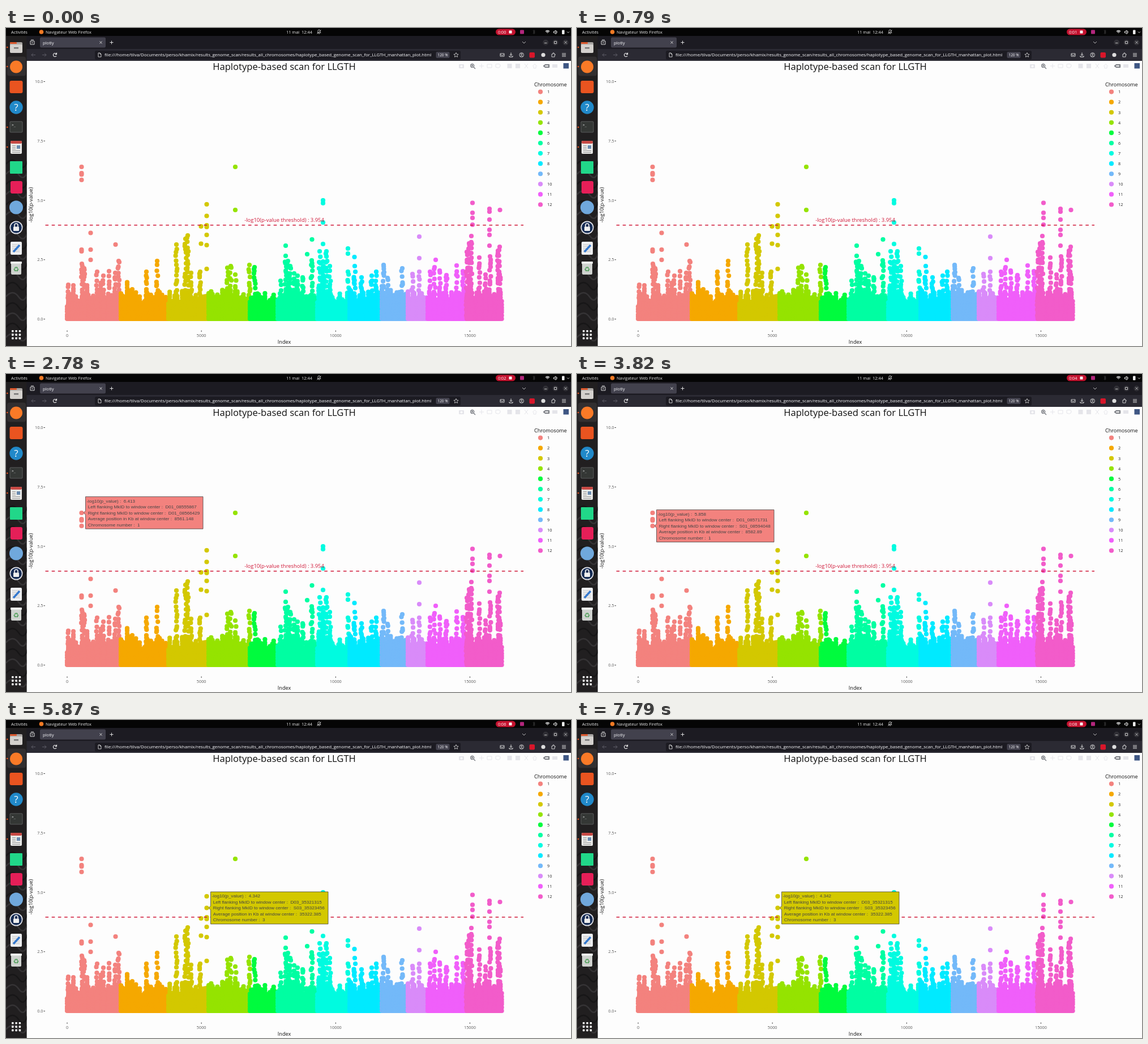
Write an HTML page with a canvas that moves like this. It is 998x561 px and loops after 8000 ms.

```html
<!DOCTYPE html>
<html lang="fr">
<head>
<meta charset="utf-8">
<title>Haplotype-based scan</title>
<style>
html, body { margin: 0; width: 100%; height: 100%; overflow: hidden; background: #000; }
canvas { display: block; }
</style>
</head>
<body>
<canvas id="stage" width="998" height="561"></canvas>
<script>
const LOOP = 8000;
const SANS = '"Open Sans", sans-serif';
const ARIAL = '"Liberation Sans", Arial, sans-serif';
const COLORS = ['#f3827e', '#f5a800', '#d3c800', '#95e300', '#00fb3e', '#00fea2',
  '#00fbe0', '#00eaff', '#73b9f9', '#d98bf9', '#f05ffa', '#f25cca'];
const STARTS = [108, 203, 287, 358, 431, 480, 550, 607, 664, 710, 745, 814, 876];

// Dense columns per chromosome: x, top, x, top ...
const STACKS = [
  [110, 453, 134, 416, 138, 424, 161, 430, 172, 437, 182, 429, 193, 432, 199, 411],
  [217, 463, 223, 461, 248, 430, 267, 411],
  [301, 382, 317, 372, 321, 366, 327, 432, 343, 430],
  [391, 423, 397, 420, 405, 435, 430, 418],
  [439, 422],
  [485, 446, 494, 402, 498, 411, 502, 420, 509, 433, 515, 437, 524, 440, 540, 410],
  [554, 394, 560, 412, 566, 394, 572, 420, 604, 430],
  [616, 420, 628, 440, 646, 437, 654, 430],
  [667, 418, 674, 441, 700, 424],
  [718, 434, 730, 430],
  [749, 430, 757, 422, 766, 428, 778, 436, 796, 419, 807, 429],
  [814, 395, 818, 380, 822, 367, 836, 405, 847, 435, 855, 403, 869, 393, 872, 386]
];
// Isolated points above the columns, by x
const PEAKS = {
  133.5: [245, 256, 258.5, 268, 391, 394], 149.5: [361.5, 391, 409], 193.5: [382],
  344.5: [350, 380.5], 354.5: [311, 331.5, 348, 351, 365, 383, 425],
  405: [245, 321], 494: [384], 532: [399], 540.5: [373], 560: [304, 309, 343, 381],
  604: [389, 398], 615.5: [404], 730: [368, 406], 759: [409],
  824: [308.5, 326, 335, 347], 854: [319, 324, 338, 356, 365, 384], 872.5: [321]
};

const TIPS = [
  { from: 1230, to: 3110, x: 133.5, y: 244.8, chr: 1, p: '6.413', left: 'D01_08555867', right: 'D01_08566429', pos: '8561.148' },
  { from: 3110, to: 3470, x: 133.5, y: 256, chr: 1, p: '6.148', left: 'D01_08566429', right: 'D01_08571731', pos: '8569.08' },
  { from: 3470, to: 5390, x: 133.5, y: 268, chr: 1, p: '5.858', left: 'D01_08571731', right: 'S01_08594048', pos: '8582.89' },
  { from: 5870, to: 6040, x: 354.5, y: 331.5, chr: 3, p: '4.342', left: 'D03_35321315', right: 'S03_35323456', pos: '35322.385' },
  { from: 6040, to: 7070, x: 354.5, y: 311, chr: 3, p: '4.836', left: 'S03_35323456', right: 'D03_35328702', pos: '35326.079' },
  { from: 7070, to: 8000, x: 354.5, y: 331.5, chr: 3, p: '4.342', left: 'D03_35321315', right: 'S03_35323456', pos: '35322.385' }
];

const stage = document.getElementById('stage');
const backdrop = document.createElement('canvas');
backdrop.width = 998;
backdrop.height = 561;
let ctx = backdrop.getContext('2d');

let seed = 11;
function rand() {
  seed = (seed * 16807) % 2147483647;
  return seed / 2147483647;
}
function rect(x, y, w, h, fill, radius = 0) {
  ctx.fillStyle = fill;
  ctx.beginPath();
  ctx.roundRect(x, y, w, h, radius);
  ctx.fill();
}
function dot(x, y, r, fill) {
  ctx.fillStyle = fill;
  ctx.beginPath();
  ctx.arc(x, y, r, 0, 7);
  ctx.fill();
}
function path(d, color, width = 1) {
  ctx.strokeStyle = color;
  ctx.lineWidth = width;
  ctx.stroke(new Path2D(d));
}
function text(str, x, y, size, fill, align = 'left', family = SANS, weight = 400) {
  ctx.font = `${weight} ${size}px ${family}`;
  ctx.textAlign = align;
  ctx.fillStyle = fill;
  ctx.fillText(str, x, y);
}

function drawTopBar() {
  rect(0, 0, 998, 14, '#050505');
  text('Activités', 9, 9.7, 7.5, '#e8e8e8');
  dot(62.5, 7, 3.8, '#f47a24');
  text('Navigateur Web Firefox', 70, 9.7, 7.45, '#e8e8e8');
  text('11 mai  12:44', 495, 9.7, 7.4, '#eee');
  path('M550 8.5h6l-1-1.5v-2a2 2 0 0 0-4 0v2zM549.5 10.5l7-7M552 10h2', '#ddd', .8);
  rect(865, 1.5, 35, 11, '#c4122f', 5.5);
  rect(888.5, 4.5, 5, 5, '#fff', .5);
  rect(908, 3.5, 7, 7, '#b3267d', 1);
  path('M930.5 4.5l4 4-2 2v-7l2 2-4 4', '#3b3b3b', .8);
  path('M953 6q3.500-3 7 0M954.500 7.500q2-1.500 4 0M956.500 9.500v.5', '#eee', 1.3);
  path('M967.5 6v2.500h1.500l2 2v-6.500l-2 2zM972.5 5q1.500 2 0 4.500', '#eee', 1);
  rect(982, 3.5, 4.5, 7.5, '#eee', 1);
  path('M991 6.5l2 2 2-2', '#ccc');
}

function drawBrowser() {
  rect(36, 14, 962, 23, '#1c1b22');
  rect(60, 16.5, 116, 18, '#42414d', 2.5);
  text('plotly', 65, 28.5, 7.6, '#fbfbfe');
  path('M165.500 23.500l4 4m0-4l-4 4M186.500 22.500v6m-3-3h6', '#ddd');
  path('M43 23h7v6h-7zM44 21h5M45 26h3', '#ddd');
  path('M912 24l3 3 3-3M951 26.500h4.500M968.500 23.500h4v4h-4zM986.500 23.500l4 4m0-4l-4 4', '#ccc', .9);
  dot(953.2, 25.5, 5, '#ffffff18');
  dot(970.5, 25.5, 5, '#ffffff18');
  dot(988.5, 25.5, 5, '#ffffff18');

  rect(36, 37, 962, 21, '#2b2a33');
  path('M52 47.500h-7m3-3l-3 3 3 3M64 47.500h7m-3-3l3 3-3 3', '#5d5c66');
  path('M89 46a3 3 0 1 0 0 3M89.500 43.500v3h-3', '#eee', 1.1);
  rect(157, 40, 646, 15.5, '#1c1b22', 2.5);
  path('M163 44h3l2 2v5h-5zM166 44v2h2', '#ddd', .9);
  text('file:///home/tilva/Documents/perso/khamix/results_genome_scan/results_all_chromosomes/haplotype_based_genome_scan_for_LLGTH_manhattan_plot.html',
    174, 50.4, 7.87, '#fbfbfe');
  rect(759.5, 42, 24, 11, '#42414d', 2);
  text('120 %', 771.5, 50, 6.4, '#fbfbfe', 'center');
  path('M795 43.500l1.200 2.600 2.800.3-2 2 .5 2.800-2.500-1.400-2.500 1.400.5-2.800-2-2 2.800-.3z', '#ddd', .8);
  path('M873 45h7v5h-7zM873 46.500l3.500 2 3.500-2', '#ddd', .9);
  path('M892 43.500v5m-2-2l2 2 2-2M889 49v2h6v-2', '#eee');
  path('M914.500 47.500a3.800 3.800 0 1 0-7.600 0a3.800 3.800 0 1 0 7.600 0M908.500 50q2.200-2.500 4.400 0M911.900 46.200a1.200 1.200 0 1 0-2.400 0a1.200 1.200 0 1 0 2.400 0', '#ddd', .9);
  rect(924.5, 43, 9.5, 9.5, '#d9162a', 2);
  dot(949, 47.5, 3.6, '#ddd');
  path('M964 46h2v-2h2v2h2v2h-1v3h-5z', '#ddd', .9);
  path('M982 45h7m-7 2.500h7m-7 2.500h7', '#ddd');
}

function drawDock() {
  rect(0, 14, 36.5, 547, '#211f20');
  ctx.save();
  ctx.beginPath();
  ctx.rect(0, 14, 36.5, 547);
  ctx.clip();
  for (let y = 240; y < 561; y += 18)
    path(`M0 ${y}q12-14 22 0t16-6`, y % 4 ? '#353335' : '#171617', 2.5);
  ctx.restore();
  rect(2, 50.5, 33, 34, '#55505255', 4);
  for (const y of [34, 68, 175, 210]) dot(2.3, y, 1.3, '#e95420');

  rect(7, 25, 22, 18, '#a9a6a3', 2);
  rect(7, 29, 22, 15, '#d4d1cd', 2);
  rect(7, 25, 12, 3, '#e0592d', 1);
  rect(14, 34, 8, 2.5, '#777');
  dot(18, 68.5, 11, '#fa7a27');
  rect(6.5, 93, 23, 22, '#e95420', 3);
  dot(18, 140, 11.7, '#2189c9');
  text('?', 18, 146, 17, '#fff', 'center');
  rect(6.5, 164.5, 23, 20, '#5b5d5c', 2);
  rect(7.5, 165.5, 21, 18, '#343735', 1);
  text('>_', 10, 173, 6, '#eee', 'left', '"DejaVu Sans Mono", monospace');
  rect(8, 199, 20, 23, '#e9e9e7', 2);
  rect(8, 199, 20, 5, '#c84a45', 2);
  for (let y = 207; y < 220; y += 3) rect(11, y, y < 214 ? 6 : 14, 1, '#999');
  rect(19, 207, 6, 6, '#6a8bb0');
  rect(7, 235, 22, 22, '#21d789', 1);
  rect(8, 270, 21, 22, '#e51f58', 3);
  dot(18, 316.5, 12, '#70a8dc');
  dot(18, 352, 11.5, '#e4e6ec');
  dot(18, 352, 9.8, '#172d55');
  rect(13, 350.5, 10, 7.5, '#eee', 1);
  path('M15 351v-3a3 3 0 0 1 6 0v3', '#eee', 1.7);
  rect(8, 377, 20, 23, '#edeef0', 2);
  for (let y = 382; y < 397; y += 3) rect(11, y, 13, .8, '#bbb');
  path('M13 395L24 383', '#3478ce', 3.4);
  rect(9, 413, 18, 22, '#cfd2cf', 2);
  rect(8, 412, 20, 4, '#eef0ee', 1);
  text('♻', 18, 430, 12, '#4b9c55', 'center', '"DejaVu Sans", sans-serif');
  for (let i = 0; i < 9; i++) rect(10 + i % 3 * 6.3, 533 + Math.floor(i / 3) * 6.3, 3.6, 3.6, '#f2f2f2', 1);
}

function drawModebar() {
  const faint = '#e5e5ea';
  rect(800, 64, 9, 7, faint, 1);
  dot(804.5, 67.5, 2, '#fdfdfd');
  path('M826.700 66.500a3 3 0 1 0-6 0a3 3 0 1 0 6 0M826 69l3 3M822.200 66.500h3M823.700 65v3', '#777a80', 1.3);
  path('M840 63v8m-4-4h8M850 64h8v6h-8zM865 64q9-2 8 3t-8 2z', faint);
  rect(885.5, 63, 8, 8, faint);
  rect(900, 63, 8, 8, faint);
  path('M916 71l6-8m0 8l-6-8M930 67.500l4-4 4 4M932 67v4h4v-4', faint);
  path('M950 67l2.500-2h6.500v4h-6.500z', '#777a80', 2);
  rect(965, 64, 9, 6, faint);
  rect(984.5, 62, 9.5, 9.5, '#3f5784');
}

function drawPoints() {
  const point = (x, y, chr) => dot(x, y, 4.1, COLORS[chr]);
  COLORS.forEach((_, chr) => {
    const end = STARTS[chr + 1];
    for (let x = STARTS[chr]; x < end; x += 2.2) {
      const top = 490 - 26 * rand() - (rand() < .12 ? 22 * rand() : 0);
      for (let y = 513; y > top; y -= 3 + rand() * 3) point(x, y, chr);
    }
    for (let i = 0; i < STACKS[chr].length; i += 2) {
      const [x, top] = STACKS[chr].slice(i, i + 2);
      for (let y = top; y < 513; y += 2 + rand() * (y < 460 ? 9 : 5))
        point(x + (y > top ? (rand() - .5) * 3 : 0), y, chr);
    }
    for (const [x, ys] of Object.entries(PEAKS))
      if (x >= STARTS[chr] && x < end) ys.forEach(y => point(+x, y, chr));
  });
}

function drawPlot() {
  rect(36.5, 58, 961.5, 503, '#fdfdfd');
  drawModebar();
  text('Haplotype-based scan for LLGTH', 491.5, 74, 16.6, '#111', 'center');
  for (let v = 0; v <= 10; v += 2.5) {
    const y = 513.5 - v * 41.9;
    text(v.toFixed(1), 65.5, y + 2.6, 7.3, '#5a5a5a', 'right');
    path(`M66.500 ${y}h2.500`, '#444');
  }
  for (let v = 0; v <= 15000; v += 5000) {
    const x = 108 + v * .04743;
    text(v, x, 545, 7.3, '#5a5a5a', 'center');
    path(`M${x} 533.500v2.500`, '#444');
  }
  text('Index', 491.5, 557, 9.1, '#111', 'center');
  ctx.save();
  ctx.translate(47, 312);
  ctx.rotate(-Math.PI / 2);
  text('-log10(p-value)', 0, 0, 9.1, '#111', 'center');
  ctx.restore();

  drawPoints();
  ctx.setLineDash([5.6, 5.6]);
  path('M69.500 347.800H914', '#d01838', 1.4);
  ctx.setLineDash([]);
  text('-log10(p-value threshold) : 3.954', 491.5, 341.8, 9.42, '#d01838', 'center');

  text('Chromosome', 933, 103.2, 9.1, '#111');
  COLORS.forEach((color, i) => {
    const y = 112.6 + i * 18.08;
    dot(944, y, 4.1, color);
    text(i + 1, 956, y + 2.8, 7.3, '#222');
  });
}

function drawTip({ x, y, chr, p, left, right, pos }) {
  ctx.fillStyle = COLORS[chr - 1];
  const box = new Path2D(`M${x + 3.5} ${y}l3.500-3.500v-24.900h207.500v56.800h-207.500v-24.900z`);
  ctx.fill(box);
  ctx.strokeStyle = '#444';
  ctx.lineWidth = .8;
  ctx.stroke(box);
  [`-log10(p_value) :  ${p}`,
    ` Left flanking MkID to window center :  ${left}`,
    ` Right flanking MkID to window center :  ${right}`,
    ` Average position in Kb at window center :  ${pos}`,
    ` Chromosome number :  ${chr}`
  ].forEach((line, i) => text(line, x + 8.9, y - 18.2 + i * 10.54, 8.11, '#444', 'left', ARIAL));
}

drawPlot();
drawBrowser();
drawDock();
drawTopBar();
ctx = stage.getContext('2d');

function frame(now) {
  const t = now % LOOP;
  ctx.drawImage(backdrop, 0, 0);
  text(`0:0${Math.floor((t + 210) / 1000)}`, 869, 9.7, 7.3, '#fff');
  const tip = TIPS.find(({ from, to }) => t >= from && t < to);
  if (tip) drawTip(tip);
  requestAnimationFrame(frame);
}
requestAnimationFrame(frame);
</script>
</body>
</html>
```
